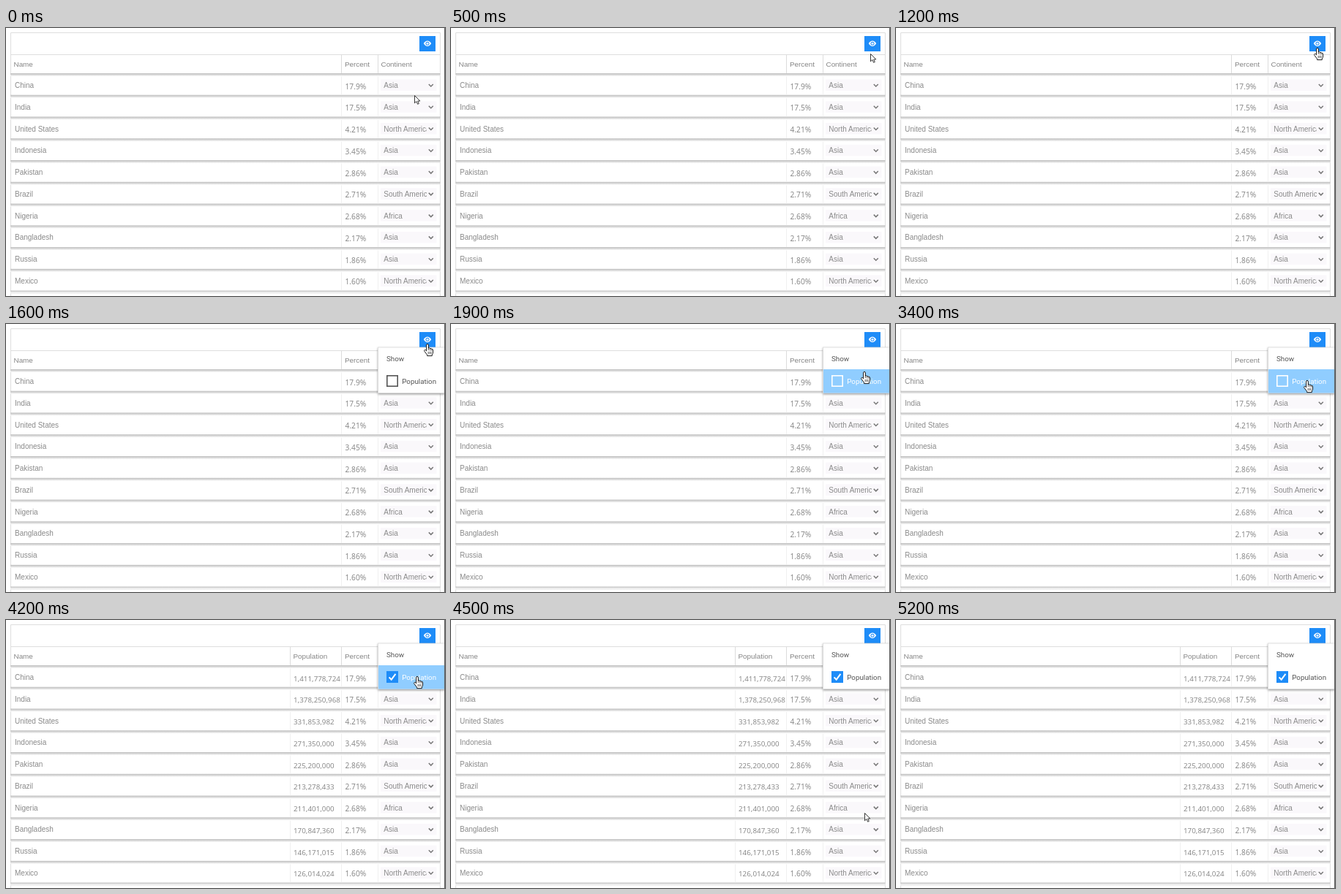
Recreate the animation shown at these times as an HTML page. Size 600 by 367 pixels, loop 5.4 s.

```html
<!DOCTYPE html>
<html lang="en">
<head>
<meta charset="utf-8">
<title>Column chooser</title>
<style>
html, body { margin: 0; width: 100%; height: 100%; overflow: hidden; background: #fff; }
svg { display: block; width: 600px; height: 367px; }
text { font: 10px "Liberation Sans", Arial, sans-serif; fill: #8a8a8a; white-space: pre; }
.head { font-size: 9.9px; fill: #858585; }
.num { font: 10.2px "Noto Sans", sans-serif; }
.pop { font: 9.8px "Noto Sans", sans-serif; }
.menu { font: 9.8px Roboto, sans-serif; fill: #555; }
</style>
</head>
<body>
<svg id="stage" viewBox="0 0 600 367">
  <defs>
    <linearGradient id="shade" x1="0" y1="0" x2="0" y2="1">
      <stop offset="0" stop-color="#bdbdbd"/>
      <stop offset=".45" stop-color="#d6d6d6"/>
      <stop offset="1" stop-color="#fafafa"/>
    </linearGradient>
    <clipPath id="label"><rect x="512" y="0" width="63" height="367"/></clipPath>
    <filter id="lift" x="-10%" y="-10%" width="120%" height="130%">
      <feDropShadow dx="0" dy="1.5" stdDeviation="1.8" flood-color="#000" flood-opacity=".38"/>
    </filter>
  </defs>
  <g id="grid"></g>
  <g id="column"></g>
  <g id="button">
    <rect x="565" y="11" width="22" height="21" fill="#1e8cf8"/>
    <path d="M570.8 21.2Q573 17.5 576 17.5T581.2 21.2Q579 24.9 576 24.9T570.8 21.2Z" fill="#fff"/>
    <circle cx="576" cy="21.2" r="2.5" fill="#1e8cf8"/>
    <circle cx="576" cy="21.2" r="1.5" fill="#fff"/>
  </g>
  <g id="menu">
    <rect x="508.5" y="32" width="91" height="62.5" fill="#fff" stroke="#d5d5d5" stroke-width=".7" filter="url(#lift)"/>
    <rect id="item" x="509" y="62" width="90.5" height="32.5" fill="#90cdff"/>
    <text class="menu" x="520" y="51">Show</text>
    <rect id="box" x="520.8" y="70.8" width="14.4" height="14.4" stroke-width="1.6"/>
    <path id="tick" d="M523.6 78.4L526.7 81.6L532.4 73.8" fill="none" stroke="#fff" stroke-width="2"/>
    <text id="option" class="menu" x="541.2" y="82">Population</text>
  </g>
  <path d="M599.5 0V367" stroke="#606060"/>
  <path id="arrow" d="M.5 .5V10.8L2.9 8.6L4.6 12.3L6.3 11.5L4.7 8H7.9Z" fill="#fff" stroke="#222" stroke-width=".9"/>
  <g id="hand" stroke="#1a1a1a" stroke-linejoin="round" stroke-linecap="round">
    <path d="M-1.4 8.6V.9Q-1.4-.6 0-.6T1.4 .9V5Q3.2 4.2 3.7 5.6Q5.3 5 5.8 6.3Q7.6 6 7.6 7.9V11Q7.6 12.6 6.3 14V15.6H-.4V14.2L-3.9 9.6Q-4.9 8-3.7 7.4Q-2.6 7-1.4 8.6Z" fill="#fff" stroke-width="1"/>
    <path d="M1.4 5V7.6M3.7 5.6V8M5.8 6.3V8.4M1.2 10.2V12.8M3.2 10.2V12.8M5.1 10.2V12.8" fill="none" stroke-width=".7"/>
  </g>
</svg>
<script>
const LOOP = 5400, STEP = 100;
const countries = [
  ["China", "1,411,778,724", "17.9%", "Asia"],
  ["India", "1,378,250,968", "17.5%", "Asia"],
  ["United States", "331,853,982", "4.21%", "North America"],
  ["Indonesia", "271,350,000", "3.45%", "Asia"],
  ["Pakistan", "225,200,000", "2.86%", "Asia"],
  ["Brazil", "213,278,433", "2.71%", "South America"],
  ["Nigeria", "211,401,000", "2.68%", "Africa"],
  ["Bangladesh", "170,847,360", "2.17%", "Asia"],
  ["Russia", "146,171,015", "1.86%", "Asia"],
  ["Mexico", "126,014,024", "1.60%", "North America"]
];
// time, x, y of the pointer's hot spot
const track = [
  [0, 558, 92], [200, 561, 78], [400, 571, 44], [600, 575, 25],
  [800, 574, 26], [1000, 576, 28], [1700, 576, 28], [1800, 573, 41],
  [1900, 565, 66], [2000, 562, 78], [4300, 562, 78],
  [4400, 563, 150], [4500, 565, 264], [LOOP, 565, 264]
];
const $ = id => document.getElementById(id);

function add(parent, tag, attrs, content) {
  const el = document.createElementNS("http://www.w3.org/2000/svg", tag);
  for (const key in attrs) el.setAttribute(key, attrs[key]);
  if (content) el.textContent = content;
  parent.appendChild(el);
  return el;
}
const label = (parent, x, y, content, attrs) => add(parent, "text", { x, y, ...attrs }, content);
const line = (parent, d, stroke) => add(parent, "path", { d, stroke, fill: "none" });
const shade = y => add($("grid"), "rect", { x: 6, y, width: 587.5, height: 4, fill: "url(#shade)" });

function build() {
  const grid = $("grid"), column = $("column");
  line(grid, "M6.5 367V6.5H593.5V367M6.5 36.5H593.5", "#dedede");
  line(grid, "M458.5 37V62M508.5 37V62", "#dcdcdc");
  line(column, "M388.5 37V62", "#dcdcdc");
  shade(62);
  const head = { class: "head" };
  label(grid, 10.5, 53, "Name", head);
  label(grid, 463, 53, "Percent", head);
  label(grid, 512.5, 53, "Continent", head);
  label(column, 392.5, 53, "Population", head);

  countries.forEach(([name, people, share, place], i) => {
    const y = 78.5 + i * 29.77;
    const edge = x => `M${x} ${y - 12}V${y + 13}`;
    shade(y + 13.2);
    line(grid, edge(458.5) + edge(508.5), "#f0f0f0");
    line(column, edge(388.5), "#f0f0f0");
    add(grid, "rect", { x: 512, y: y - 8, width: 76.5, height: 15.5, fill: "#faf8fb" });
    label(grid, 12, y + 3.5, name);
    label(grid, 463.5, y + 5, share, { class: "num" });
    label(grid, 516.3, y + 3.5, place, { "clip-path": "url(#label)" });
    label(column, 393, y + 5, people, { class: "pop" });
    add(grid, "path", {
      d: `M577.8 ${y - 1.5}l3 3l3-3`, fill: "none", stroke: "#777", "stroke-width": 1.5
    });
  });
  add(grid, "rect", { x: 6, y: 361, width: 587.5, height: 2.5, fill: "#ececec" });
}

function pointer(t) {
  const n = track.findIndex(p => p[0] > t);
  const [t0, x0, y0] = track[n - 1], [t1, x1, y1] = track[n];
  const k = (t - t0) / (t1 - t0);
  return [x0 + (x1 - x0) * k, y0 + (y1 - y0) * k];
}

const show = (id, on) => $(id).setAttribute("visibility", on ? "visible" : "hidden");
const set = (id, key, value) => $(id).setAttribute(key, value);

function render(time) {
  const t = Math.floor(time % LOOP / STEP) * STEP;
  const [x, y] = pointer(t);
  const open = Math.max(0, Math.min(1, (t - 1300) / 300));
  const checked = t >= 2200 && t < 3400 || t >= 4200;
  const hover = t >= 1900 && t < 4400;
  const overButton = x > 565 && x < 587 && y > 11 && y < 32;
  const hand = overButton || t >= 1400 && t < 4400;
  const visible = t < 4600;

  set("menu", "opacity", open);
  show("column", checked);
  show("item", hover);
  show("tick", checked);
  set("box", "fill", checked ? "#1e8cf8" : "none");
  set("box", "stroke", checked ? "#1e8cf8" : hover ? "#fff" : "#555");
  $("option").style.fill = hover ? "#fff" : "#555";
  show("hand", visible && hand);
  show("arrow", visible && !hand);
  const place = `translate(${Math.round(x)} ${Math.round(y)})`;
  set("hand", "transform", place);
  set("arrow", "transform", place);
}

build();
const start = performance.now();
function tick() {
  render(performance.now() - start);
  requestAnimationFrame(tick);
}
tick();
</script>
</body>
</html>
```
